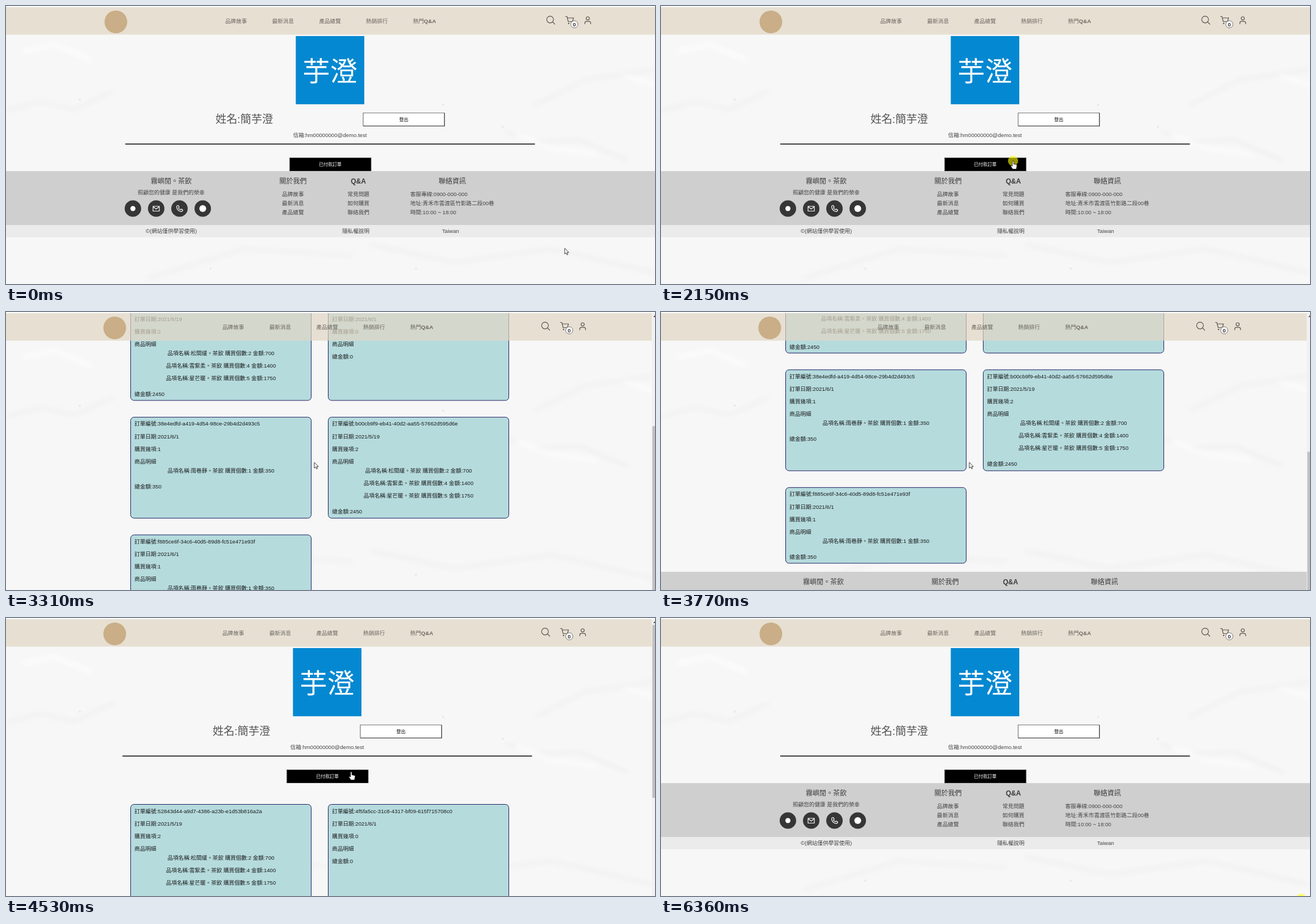
Write an HTML page that moves like this. It is 1143 by 490 pixels and loops after 6440 ms.

```html
<!DOCTYPE html>
<html lang="zh-Hant">
<head>
<meta charset="utf-8">
<title>會員訂單</title>
<style>
  html, body { margin: 0; width: 100%; height: 100%; overflow: hidden; background: #f7f7f7; }
  svg { display: block; width: 100vw; height: 100vh; }
  text { font-family: "Liberation Sans", "Noto Sans CJK TC", "Noto Sans CJK", sans-serif; white-space: pre; }
  .icon { fill: none; stroke: #57534e; stroke-width: 1.2; stroke-linecap: round; stroke-linejoin: round; }
  .light { stroke: #fff; }
</style>
</head>
<body>
<svg id="stage" viewBox="0 0 1143 490"></svg>
<script>
const LOOP = 6440, MAX_SCROLL = 443;
const OPEN_AT = 2300, CLOSE_AT = 4880;
const CLICKS = [[2150, 2300], [4730, 4880], [6360, 6440]];

// time, x, y of the pointer's hot spot
const POINTER = [
  [30, 984, 427], [760, 448, 112], [1110, 868, 241], [1250, 797, 212], [1390, 794, 207],
  [2000, 620, 273], [2300, 620, 273], [2830, 546, 274], [2900, 543, 265], [4270, 543, 265],
  [4500, 608, 271], [4880, 608, 271], [5150, 602, 271], [5370, 602, 271], [6040, 1124, 487],
  [6170, 1127.5, 495]
];
const SCROLL = [[2920, 0], [3310, 349], [3460, MAX_SCROLL], [3740, MAX_SCROLL], [3770, 434], [4270, 0]];

const text = (str, x, cy, { size = 9.6, anchor = 'middle', fill = '#444', weight = 400 } = {}) =>
  `<text x="${x}" y="${cy + size * .37}" font-size="${size}" text-anchor="${anchor}" fill="${fill}" font-weight="${weight}">${str}</text>`;
const rect = (x, y, w, h, fill, extra = '') =>
  `<rect x="${x}" y="${y}" width="${w}" height="${h}" fill="${fill}" ${extra}/>`;
const circle = (x, y, r, fill, extra = '') =>
  `<circle cx="${x}" cy="${y}" r="${r}" fill="${fill}" ${extra}/>`;
const icon = (d, cls = '') => `<path class="icon ${cls}" d="${d}"/>`;
const list = (items, x, anchor) =>
  items.map((s, i) => text(s, x, 40 + i * 16, { anchor })).join('');

// outset border: grey above and left, dark below and right
const button = (label, x, y, fill, ink) =>
  rect(x, y, 143.2, 23, fill) + '<g fill="none" stroke-width="1.2">' +
  `<path d="M${x} ${y + 23}v-23h143.2" stroke="#777"/><path d="M${x} ${y + 23}h143.2v-23" stroke="#222"/></g>` +
  text(label, x + 71.6, y + 12, { size: 8, fill: ink });

function paper() {
  const creases = [
    ['M880 222L935 240L1010 236L1095 272', '#e9e9e9', 3], ['M900 228L960 250L1040 262', '#fff', 4],
    ['M930 175L1020 130L1143 112', '#efefef', 5], ['M1090 122L1143 140', '#fff', 4],
    ['M0 185L60 168L120 182L190 150', '#efefef', 5], ['M30 80L85 68L150 95', '#fff', 5],
    ['M250 480L420 428L610 440', '#efefef', 5], ['M640 420L790 452L960 428L1143 470', '#f0f0f0', 6]
  ];
  const specks = [[875, 213], [770, 174], [360, 463], [722, 463], [130, 165]];
  return rect(0, 0, 1143, 490, '#f7f7f7') + '<g filter="url(#soft)" fill="none">' +
    creases.map(([d, color, w]) => `<path d="${d}" stroke="${color}" stroke-width="${w}"/>`).join('') +
    '</g>' + specks.map(([x, y]) => circle(x, y, 2, '#e9e9e9')).join('');
}

function profile() {
  return rect(510.4, 53, 120.6, 120.2, '#0488d1') +
    text('芋澄', 570.5, 114, { size: 48, fill: '#fff', weight: 500 }) +
    text('姓名:簡芋澄', 369, 199, { size: 19.2, anchor: 'start', weight: 300, fill: '#555' }) +
    text('信箱:hm00000000@demo.test', 570.5, 227) +
    rect(210, 242.6, 721.5, 1.5, '#000') +
    button('登出', 629, 188.5, '#fff', '#000') +
    button('已付款訂單', 499.5, 267.5, '#000', '#fff');
}

function card(x, y, height, id, date, count, items, total) {
  const fill = '#1c1c1c', left = { anchor: 'start', fill };
  return rect(x, y, 318, height, '#b5dbdd', 'rx="6" stroke="#1c1c62"') +
    [`訂單編號:${id}`, `訂單日期:${date}`, `購買幾項:${count}`, '商品明細']
      .map((s, i) => text(s, x + 6.8, y + 11.5 + i * 22.1, left)).join('') +
    items.map(([name, n, price], i) =>
      text(`品項名稱:${name}。茶飲 購買個數:${n} 金額:${price}`, x + 159, y + 93.7 + i * 22, { fill })).join('') +
    text(`總金額:${total}`, x + 6.8, y + 100 + items.length * 22, left);
}

function orders() {
  const trio = [['松間緩', 2, 700], ['雲絮柔', 4, 1400], ['星芒暖', 5, 1750]];
  const single = [['雨巷靜', 1, 350]];
  const a = 219.5, b = 567.5;
  return card(a, 328.5, 177, '52843d44-a9d7-4386-a23b-e1d53b816a2a', '2021/5/19', 2, trio, 2450) +
    card(b, 328.5, 177, '4f5fa5cc-31c8-4317-bf09-615f715708c0', '2021/6/1', 0, [], 0) +
    card(a, 535, 178, '38e4edfd-a419-4d54-98ce-29b4d2d493c5', '2021/6/1', 1, single, 350) +
    card(b, 535, 178, 'b00cb9f9-eb41-40d2-aa55-57662d595d6e', '2021/5/19', 2, trio, 2450) +
    card(a, 742.5, 133.5, 'f885ce6f-34c6-40d5-89d8-fc51e471e93f', '2021/6/1', 1, single, 350);
}

function footer() {
  const head = { size: 12, weight: 500, fill: '#3c3c3c' };
  return rect(-20, 0, 1200, 95, '#cfcfcf') + rect(-20, 95, 1200, 21.5, '#ebebeb') +
    text('霧嶼閒。茶飲', 291, 18, head) + text('關於我們', 505.5, 18, head) +
    text('Q&amp;A', 620.5, 18, { ...head, weight: 700 }) + text('聯絡資訊', 786, 18, head) +
    text('照顧您的健康 是我們的榮幸', 291, 37) +
    [223.5, 264.5, 305.5, 346.5].map(x => circle(x, 66, 14.5, '#363636')).join('') +
    circle(223.5, 66, 4.5, '#fff') + circle(346.5, 66, 6, '#fff') +
    icon('M259 62h11v8.5h-11zM259 62.5l5.5 4.5l5.5-4.5', 'light') +
    icon('M301.5 61l2-.5l1.5 3l-1.3 1.4q1 2.3 3.2 3.3l1.4-1.3l2.8 1.5q.2 2.6-2.3 3q-7.5-1-8.3-8.4q.1-1.5 1-2z', 'light') +
    list(['品牌故事', '最新消息', '產品總覽'], 505.3) +
    list(['常見問題', '如何購買', '聯絡我們'], 620.7) +
    list(['客服專線:0900-000-000', '地址:青禾市雲渡區竹影路二段00巷', '時間:10:00 ~ 18:00'], 712, 'start') +
    text('©(網站僅供學習使用)', 291, 105.5) + text('隱私權說明', 616, 105.5) + text('Taiwan', 783, 105.5);
}

function header() {
  const nav = ['品牌故事', '最新消息', '產品總覽', '熱銷排行', '熱門<tspan font-weight="700">Q&amp;A</tspan>'];
  return rect(0, 2, 1143, 48.5, 'rgb(225,214,195)', 'opacity=".7"') + rect(0, 0, 1143, 2, '#fdfdfd') +
    `<g id="logo">${circle(193.5, 28, 20, '#c9ae87')}</g><g id="nav">` +
    nav.map((s, i) => text(s, 386 + i * 82.7, 26, { anchor: 'start', fill: '#6b6660', weight: 500 })).join('') +
    '</g><g id="tools">' +
    '<circle class="icon" cx="958.3" cy="23.8" r="6"/>' + icon('M962.7 28.2L966.5 32') +
    icon('M985.5 18.5h2.5l2.2 9h7.4l2-6.5h-10.5') +
    circle(991, 30.8, 1.2, '#57534e') + circle(997, 30.8, 1.2, '#57534e') +
    circle(1001, 32.3, 6.3, '#fff', 'stroke="#555" stroke-width=".8"') +
    text('0', 1001, 32.3, { fill: '#333', weight: 700 }) +
    '<circle class="icon" cx="1024.6" cy="21.8" r="2.8"/>' + icon('M1019.5 31.5v-1.5q0-2.8 3-2.8h4.2q3 0 3 2.8v1.5') + '</g>';
}

const stage = document.getElementById('stage');
stage.innerHTML =
  '<defs><filter id="soft" x="-10%" y="-10%" width="120%" height="120%"><feGaussianBlur stdDeviation="4"/></filter></defs>' +
  paper() +
  `<g id="page"><g id="profile">${profile()}</g><g id="orders">${orders()}</g><g id="footer">${footer()}</g></g>` +
  header() +
  '<g id="bar">' + rect(1137.3, 2, 6, 488, '#f1f1f1') + '<path d="M1140 9l3-3.5v3.5z" fill="#505050"/>' +
  rect(1138.3, 12, 5, 305, '#c1c1c1', 'id="thumb"') + '</g>' +
  circle(0, 0, 9, '#ff0', 'id="ring" opacity=".6"') +
  '<g id="pointer" fill="#fff" stroke="#111" stroke-width=".8" stroke-linejoin="round">' +
  '<path id="arrow" d="M0 0V10.2L2.4 8L4 11.6L5.6 10.9L4.1 7.4H7.2Z"/>' +
  '<path id="hand" d="M-1.2 9V1.2a1.2 1.2 0 0 1 2.4 0V5.5L5.6 6.4Q7 6.8 7 8.4L6 12.5V14.5H-.5L-4 9.4Q-4 7.6 -1.2 9Z"/></g>';

const parts = Object.fromEntries([...stage.querySelectorAll('[id]')].map(el => [el.id, el]));
const move = (id, x, y = 0) => parts[id].setAttribute('transform', `translate(${x} ${y})`);
const show = (id, on) => parts[id].setAttribute('visibility', on ? 'visible' : 'hidden');

const linear = u => u, smooth = u => u * u * (3 - 2 * u);
function sample(keys, t, ease) {
  const next = keys.findIndex(k => k[0] > t);
  if (next < 0) return keys[keys.length - 1].slice(1);
  if (next === 0) return keys[0].slice(1);
  const from = keys[next - 1], to = keys[next];
  const u = ease((t - from[0]) / (to[0] - from[0]));
  return from.slice(1).map((v, i) => v + (to[i + 1] - v) * u);
}

function draw(t) {
  const open = t >= OPEN_AT && t < CLOSE_AT;
  const [scroll] = sample(SCROLL, t, linear);
  const [x, y] = sample(POINTER, t, smooth);
  const shift = open ? -5 : 0;

  move('page', 0, -scroll);
  move('profile', shift);
  move('footer', shift, open ? 891 : 291);
  move('logo', open ? -2 : 0);
  move('nav', shift);
  move('tools', open ? -9 : 0);
  move('thumb', 0, scroll * .541);
  show('orders', open);
  show('bar', open);

  const px = x - shift, py = y + scroll;
  const over = (l, top, r, bottom) => px > l && px < r && py > top && py < bottom;
  const onButton = over(499, 267, 643, 291) || over(628, 188, 773, 212);
  move('pointer', x, y);
  show('hand', onButton);
  show('arrow', !onButton);
  move('ring', x, y);
  show('ring', CLICKS.some(([from, to]) => t >= from && t < to));
}

const start = performance.now();
function tick(now) {
  draw(Math.max(0, now - start) % LOOP);
  requestAnimationFrame(tick);
}
draw(0);
requestAnimationFrame(tick);
</script>
</body>
</html>
```
